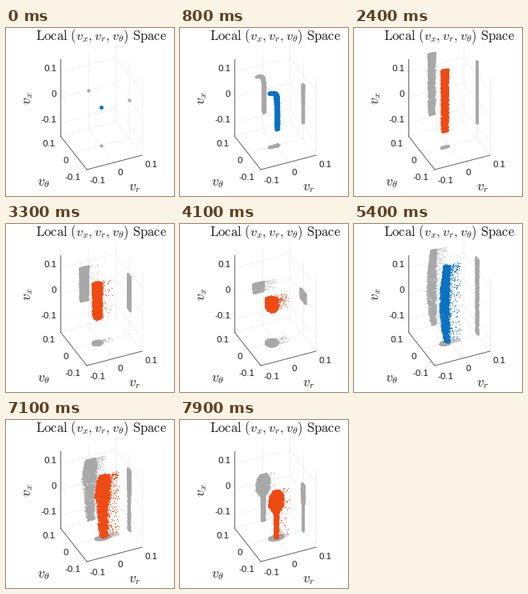
A matplotlib script that plays this animation: 210 by 210 pixels, repeating every 8 s.

```python
import numpy as np
import matplotlib.pyplot as plt
from matplotlib.animation import FuncAnimation

plt.rcParams["mathtext.fontset"] = "cm"
plt.rcParams["font.family"] = "Liberation Sans"

SIZE, DPI = 210, 100
FRAMES, STEP = 80, 100
PX = 72 / DPI
BLUE, ORANGE = "#0a72c0", "#ee4a14"
INK, AXIS, GRID = "0.1", "0.35", "0.94"
STAGES = [0, 1300, 2400, 4100, 5400, 6300, 7900]
SWITCHES = [1900, 4700, 7100]
REACH = .4

rng = np.random.default_rng(4)
N = 1700
along, pick = rng.random(N), rng.random(N)
angle, radius = rng.random(N) * 2 * np.pi, np.sqrt(rng.random(N))
side_r, side_t = radius * np.cos(angle), radius * np.sin(angle)
order = np.arange(N) / N


def project(r, t, z):
    """Cube coordinates in [-1, 1] to stage pixels."""
    return 119 + 34.5 * r - 16.5 * t, 99 - 9 * r - 21 * t - 48 * z


def ramp(ms, start, end):
    return min(max((ms - start) / (end - start), 0), 1)


def cloud(ms):
    """Particle positions, dense and stray masks, and dot size."""
    grow, lift, squeeze, stretch, shift, sink = (
        ramp(ms, a, b) for a, b in zip(STAGES, STAGES[1:]))

    # velocity spread along x, then the cross-section
    mid = -.15 * grow + .35 * lift - .2 * squeeze - .4 * sink
    half = .8 * grow - .68 * squeeze + .85 * stretch - .37 * sink
    center = (.1 * grow - .27 * lift + .03 * squeeze + .04 * stretch
              + .23 * shift - .1 * sink)
    wide = (.08 * grow + .05 * lift + .07 * squeeze - .1 * stretch
            + .13 * shift - .16 * sink)
    deep = .03 * grow + .17 * squeeze - .1 * stretch - .05 * sink

    level = np.sin(along * np.pi / 2)
    knob = .2 * sink * np.exp(-((level - .78) / .2) ** 4)
    hook = .42 * (grow - lift) * along ** 6
    belly = .15 * (stretch - sink) * np.sin(np.pi * level)
    r = (center - hook - belly * (1 - side_r) / 2
         + (wide + knob) * side_r)
    t = (deep + .4 * knob) * side_t
    z = np.clip(mid + half * (2 * level - 1), -1, 1)

    # strays peel off the high side and thin out
    share = .05 * squeeze + .08 * stretch + .12 * shift - .2 * sink
    stray = pick < share
    r[stray] = center + wide + REACH * (1 - pick[stray] / share) ** 1.5

    born = order <= grow
    return r, t, z, born & ~stray, born & stray, 5 - 2 * grow - .6 * lift


fig = plt.figure(figsize=(SIZE / DPI, SIZE / DPI), dpi=DPI, facecolor="white")
ax = fig.add_axes([0, 0, 1, 1])
ax.set_xlim(0, SIZE)
ax.set_ylim(SIZE, 0)
ax.axis("off")


def edge(a, b, color):
    (x0, y0), (x1, y1) = project(*a), project(*b)
    ax.plot([x0, x1], [y0, y1], color=color, lw=.9 * PX, zorder=1)


def label(x, y, text, px, ha="center", **kw):
    ax.text(x, y, text, fontsize=px * PX, ha=ha, va="center", color=INK, **kw)


for k in (-1, 0, 1):
    h = k * 2 / 3
    edge((k, -1, -1), (k, 1, -1), GRID)
    edge((-1, k, -1), (1, k, -1), GRID)
    edge((k, 1, -1), (k, 1, 1), GRID)
    edge((1, k, -1), (1, k, 1), GRID)
    edge((-1, 1, h), (1, 1, h), GRID)
    edge((1, 1, h), (1, -1, h), GRID)

    name = f"{k / 10:g}"
    label(63, 83 - 32 * k, name, 11.5, "right")
    label(77.5 - 15.5 * k, 166 - 21 * k, name, 11.5, "right")
    label(139 + 35 * k, 181 - 9.5 * k, name, 11.5, "left")

corner = (-1, -1, -1)
edge((-1, 1, -1), (-1, 1, 1), AXIS)
edge((-1, 1, -1), corner, AXIS)
edge(corner, (1, -1, -1), AXIS)

label(119, 11, r"$\mathrm{Local}\ (v_x,v_r,v_\theta)\ \mathrm{Space}$", 16.6)
label(28, 88, "$v_x$", 17, rotation=90)
label(47, 195, r"$v_\theta$", 17)
label(161, 201, "$v_r$", 17)


def dots(color, z):
    return ax.plot([], [], "o", mew=0, color=color, zorder=z)[0]


shades = [(dots("0.66", 3), dots("0.78", 2)) for _ in range(3)]
body = dots(BLUE, 5), dots(BLUE, 4)


def place(pair, r, t, z, masks, dot):
    x, y = project(r, t, z)
    for artist, mask, size in zip(pair, masks, (dot, 1.2)):
        artist.set_data(x[mask], y[mask])
        artist.set_markersize(size * PX)


def draw(i):
    ms = i * STEP
    r, t, z, dense, stray, dot = cloud(ms)
    masks, wall = (dense, stray), np.ones(N)
    place(shades[0], r, wall, z, masks, dot * .85)
    place(shades[1], wall, t, z, masks, dot * .85)
    place(shades[2], r, t, -wall, masks, dot * .85)
    place(body, r, t, z, masks, dot)
    color = (BLUE, ORANGE)[sum(ms >= s for s in SWITCHES) % 2]
    for artist in body:
        artist.set_color(color)
    return [a for pair in shades + [body] for a in pair]


anim = FuncAnimation(fig, draw, frames=FRAMES, interval=STEP,
                     repeat=True, repeat_delay=0)
plt.show()
```
